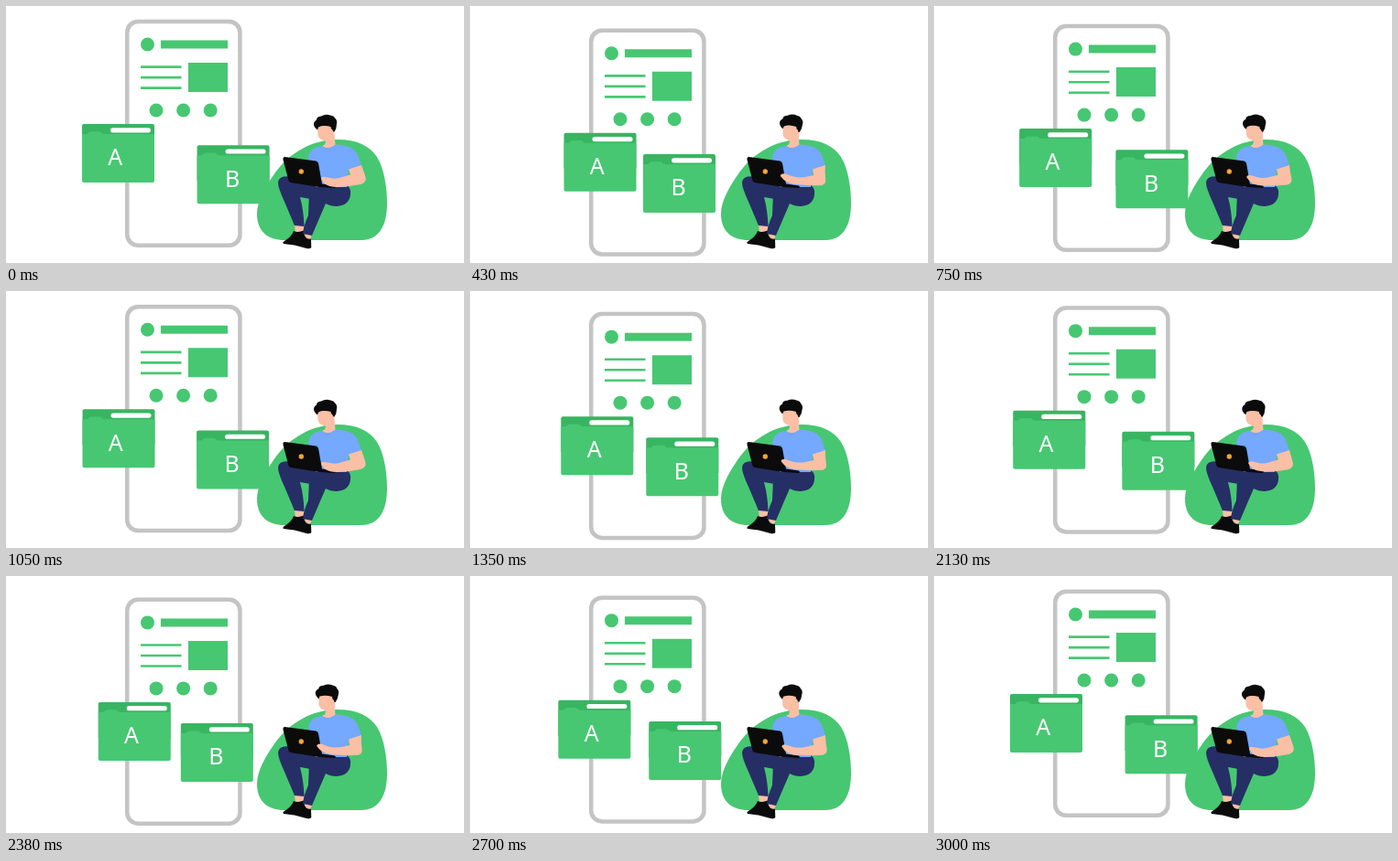
An HTML page with a canvas for the animation above (3030 ms loop, 500 by 281 pixels).

```html
<!DOCTYPE html>
<html lang="en">
<head>
<meta charset="utf-8">
<title>A/B folders</title>
<style>
html, body { margin: 0; width: 100%; height: 100%; overflow: hidden; background: #fff; }
canvas { display: block; }
</style>
</head>
<body>
<canvas id="stage" width="500" height="281"></canvas>
<script>
const ctx = document.getElementById('stage').getContext('2d');

const LOOP = 3030, SWING = 1000, ACTIVE = 3000;
const SHIFT_X = 20.5, SHIFT_Y = 10.25;
const GREEN = '#47c772', DARK_GREEN = '#38b561', GRAY = '#c4c4c4';
const SKIN = '#fbbfa5', SHIRT = '#75a8ff', NAVY = '#262e66', BLACK = '#0b0b0c';

const bag = 'M362 146 C383 146 397 153 405 165 C413 178 416 199 416 216 C416 240 407 256 388 256 L304 256 C286 256 274 247 274 227 C274 213 284 196 294 182 C309 161 334 146 362 146 Z';
const folderFront = 'M0 11 L4.5 11 Q6 11 7 9.5 Q8 8.3 10 8.3 L18.5 8.3 Q20 8.3 21 9.6 Q22 11 24 11 L79 11 L79 62 Q79 64 77 64 L2 64 Q0 64 0 62 Z';
const torso = 'M345 153 Q352 157 360 151.5 C372 152 380 155 383 161 Q386 167 388 174.5 L374 178.5 L372 198 L338 198 L330 166 Q331 155 345 153 Z';
const backLeg = 'M338 194 L372 196 Q377 199 376 206 Q375 218 361 219 Q354 219 349 216 Q342 232 334 251 L324 249 Q325 240 330 229 L331 205 Z';
const frontLeg = 'M309 186.5 Q298 185 297 193 Q297 199 304 214 L315 240 L325.5 241 Q325 224 321 209 L350 214 L368 217 L374 199 L338 196 Z';
const shoes = 'M314 246 Q319 248 325 245.5 L326 251 Q329 256 333 254.5 L333.3 264 Q332 266 328 265 L315 261.5 L303 260 Q301.5 258.5 304 257 Q312 252 314 246 Z';
const laptop = 'M304.5 165 L338.5 169.5 Q340.5 170 341 172 L345 194.5 L359 196.5 Q361 198 358.5 199 L342 198 L310.5 193 Q309 192.5 308.5 191 L302.5 168 Q302 165 304.5 165 Z';
const neck = 'M348 143 L358.5 140 L359.5 152 Q354 157 347.5 154 L349 148 Z';
const face = 'M340 132 L358 130 L358.5 142 Q354 148 347 147 Q341.5 146 340.5 141 Z';
const hair = 'M340 135.5 Q335.5 132 336 128 Q337 125.5 339 124.5 Q339 121 344 120.5 Q349 117.5 354 119.5 Q358 120 359 122.5 Q362 125 361 129 Q361 134 358.5 137.5 Q357 138 356.5 135.5 Q354.5 135 354.5 132 Q347 130 341 132.5 Z';

function fill(path, color) {
  ctx.fillStyle = color;
  ctx.fill(new Path2D(path));
}

function box(x, y, w, h, color, r = 0) {
  ctx.fillStyle = color;
  ctx.beginPath();
  ctx.roundRect(x, y, w, h, r);
  ctx.fill();
}

function dot(x, y, r, color) {
  ctx.fillStyle = color;
  ctx.beginPath();
  ctx.arc(x, y, r, 0, Math.PI * 2);
  ctx.fill();
}

function at(x, y, draw) {
  ctx.save();
  ctx.translate(x, y);
  draw();
  ctx.restore();
}

function drawPhone() {
  box(130, 14.7, 127.7, 249.3, GRAY, 14);
  box(134.5, 19.2, 118.7, 240.3, '#fff', 10);
  dot(154.5, 42, 7.5, GREEN);
  box(169, 37.5, 73, 9, GREEN);
  for (let i = 0; i < 3; i++) {
    box(147, 65.3 + i * 11.5, 44.5, 2.6, GREEN);
    dot(164 + i * 29.6, 114, 7.5, GREEN);
  }
  box(199, 62, 43, 32, GREEN);
}

function drawFolder(label, labelX) {
  box(0, 0, 79, 40, DARK_GREEN, 2);
  fill(folderFront, GREEN);
  box(31, 4.2, 44, 5.2, '#fff', 2.6);
  ctx.fillStyle = '#fff';
  ctx.font = '25px "Noto Sans", "Open Sans", sans-serif';
  ctx.textAlign = 'center';
  ctx.fillText(label, labelX, 45.3);
}

function drawHead(p) {
  fill(neck, SKIN);
  at(354, 151, () => {
    ctx.rotate(p * 0.095);
    ctx.translate(-354, -151);
    fill(face, SKIN);
    fill(hair, BLACK);
  });
}

function drawArm(p) {
  const m = (x, y, dx, dy) => `${x + dx * p} ${y + dy * p} `;
  fill('M374 178.5 L388 174 ' +
    'Q' + m(390, 179, -3, 2) + m(392.5, 187, -4.5, 3) +
    'Q' + m(394, 193, -5.5, 2) + m(387, 195, -3, 1) +
    'Q' + m(375, 197.5, -2, -1) + m(362, 198, -3, -3) +
    'Q' + m(352, 198, -5, -3.5) + m(347, 193.5, -5, -4) +
    'L' + m(344, 189, -5.5, -3.5) +
    'Q' + m(344, 186, -5, -3) + m(348, 187, -5, -4) +
    'L' + m(354, 188, -3, -2) +
    'Q' + m(360, 190, -2, -2) + m(367, 187, -1, 0) +
    'L' + m(376, 184.5, -1, 0.5) + 'Z', SKIN);
}

function drawPerson(p) {
  fill('M315 239 L325 239 L325 247 L316 248 Z', SKIN);
  fill('M325 249 L334 250 L332 256 L326 255 Z', SKIN);
  fill(shoes, BLACK);
  fill(backLeg, NAVY);
  fill(frontLeg, NAVY);
  drawHead(p);
  fill(torso, SHIRT);
  fill('M346 152 L359.5 150 Q354 158 346 153.5 Z', SKIN);
  fill(laptop, BLACK);
  dot(322.3, 181, 2.7, '#f2a53a');
  drawArm(p);
}

function render(now) {
  const t = now % LOOP;
  const p = t < ACTIVE ? (1 - Math.cos(t / SWING * Math.PI * 2)) / 2 : 0;
  const dx = p * SHIFT_X, dy = p * SHIFT_Y;

  box(0, 0, 500, 281, '#fff');
  at(0, dy, drawPhone);
  at(83 + dx, 129 + dy, () => drawFolder('A', 36.3));
  fill(bag, GREEN);
  at(208.6 - dx, 152.2 + dy, () => drawFolder('B', 38.6));
  drawPerson(p);
}

function tick() {
  render(performance.now());
  requestAnimationFrame(tick);
}
tick();
</script>
</body>
</html>
```
